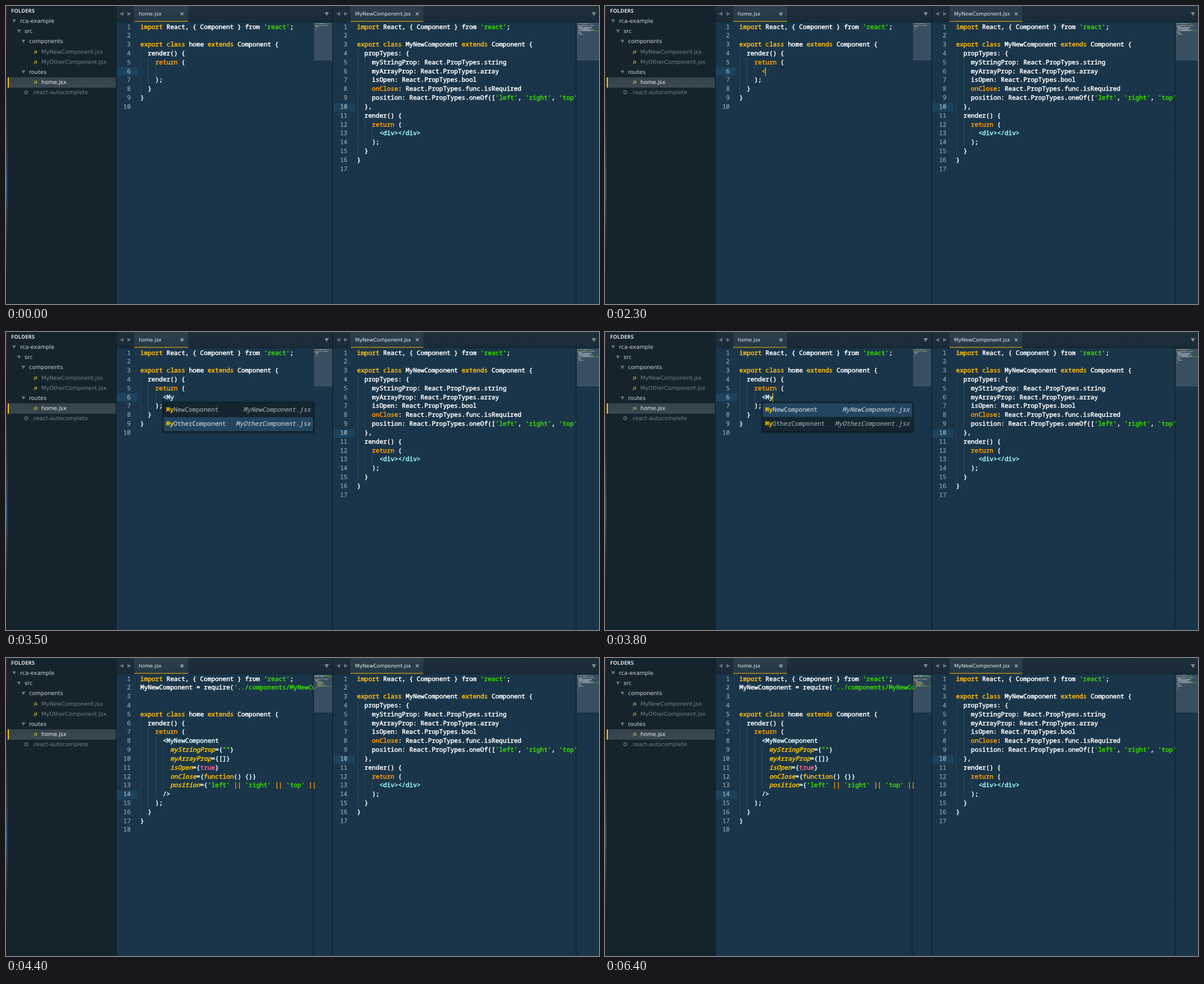
An HTML page with a canvas for the animation above (6.5 s loop, 1055 px wide and 531 px high).

```html
<!DOCTYPE html>
<html lang="en">
<head>
<meta charset="utf-8">
<title>Component autocomplete</title>
<style>
html, body { margin: 0; width: 100%; height: 100%; overflow: hidden; background: #1a3549; }
canvas { display: block; }
</style>
</head>
<body>
<canvas id="stage" width="1055" height="531"></canvas>
<script>
const ctx = document.getElementById('stage').getContext('2d');
ctx.textRendering = 'geometricPrecision';
ctx.lineJoin = 'round';

const LOOP = 6500, W = 1055, H = 531;
const CW = 6.65, LH = 15.82, TOP = 37, BASE = 3.5;
const MONO = '"Noto Sans Mono", "DejaVu Sans Mono", monospace';
const CODE = '11.08px ' + MONO;
const ITALIC = 'italic ' + CODE;
const UI = '"DejaVu Sans", "Noto Sans", sans-serif';
const YELLOW = '#ffc600';

// Each "~" starts a token; the letter after it picks the colour.
const COLORS = {
  w: '#ffffff', k: '#ffba12', o: '#ff9d00', g: '#3ad900',
  t: '#9effff', c: '#dcfbff', i: YELLOW, p: '#ff628c'
};

const IMPORT = "~kimport~w React, { Component } from ~g'react'~w;";
const classLine = name => `~kexport class~w ${name} ~kextends~w Component {`;

const homeCode = body => [
  '', classLine('home'), '~w  render() {', '~o    return~w (',
  ...body, '~w    );', '~w  }', '~w}', ''
];
const before = line => [IMPORT, ...homeCode([line])];
const after = [
  IMPORT,
  "~wMyNewComponent = require(~g'../components/MyNewComponent.jsx'~w);",
  '',
  ...homeCode([
    '~c      <MyNewComponent',
    '~i        myStringProp~c={~g""~c}',
    '~i        myArrayProp~c={[]}',
    '~i        isOpen~c={~ptrue~c}',
    '~i        onClose~c={~kfunction~c() {}}',
    "~i        position~c={~g'left' ~o|| ~g'right' ~o|| ~g'top' ~o|| ~g'bottom'~c}",
    '~c      />'
  ])
];
const component = [
  IMPORT, '', classLine('MyNewComponent'),
  '~w  propTypes: {',
  '~w    myStringProp: React.PropTypes.string',
  '~w    myArrayProp: React.PropTypes.array',
  '~w    isOpen: React.PropTypes.bool',
  '~o    onClose~w: React.PropTypes.func.isRequired',
  "~w    position: React.PropTypes.oneOf([~g'left'~w, ~g'right'~w, ~g'top'~w, ~g'bottom'~w])",
  '~w  },', '~w  render() {', '~o    return~w (',
  '~t      <div></div>',
  '~w    );', '~w  }', '~w}', ''
];

const rowY = row => TOP + (row - 1) * LH;
const rowTop = row => Math.round(rowY(row) - 6.7);

function rect(x, y, w, h, color) {
  ctx.fillStyle = color;
  ctx.fillRect(x, y, w, h);
}

// A positive weight thickens the strokes of the glyphs.
function text(str, x, y, color, font, align = 'left', weight = 0) {
  ctx.font = font;
  ctx.textAlign = align;
  ctx.fillStyle = ctx.strokeStyle = color;
  ctx.fillText(str, x, y);
  if (weight) {
    ctx.lineWidth = weight;
    ctx.strokeText(str, x, y);
  }
}

function triangle(x, y, angle, r, color) {
  ctx.save();
  ctx.translate(x, y);
  ctx.rotate(angle);
  ctx.fillStyle = color;
  ctx.beginPath();
  ctx.moveTo(r, 0);
  ctx.lineTo(-r * 0.8, -r);
  ctx.lineTo(-r * 0.8, r);
  ctx.fill();
  ctx.restore();
}

function disc(x, y, r, color) {
  ctx.fillStyle = color;
  ctx.beginPath();
  ctx.arc(x, y, r, 0, 7);
  ctx.fill();
}

function vertical(y0, y1, ...colors) {
  const g = ctx.createLinearGradient(0, y0, 0, y1);
  colors.forEach((c, i) => g.addColorStop(i / (colors.length - 1), c));
  return g;
}

function eachToken(line, draw) {
  let col = 0;
  for (const part of line.split('~').slice(1)) {
    const str = part.slice(1);
    draw(str, col, part[0]);
    col += str.length;
  }
}

const depthOf = line => line ? line.replace(/~./g, '').search(/\S|$/) / 2 : 0;

function sidebar() {
  rect(0, 0, 3, H, vertical(0, H, '#3a2226', '#241a20', '#2e3238', '#3f5668', '#26282e', '#1c1a1c'));
  rect(2.5, 0, 194, H, '#15232d');
  rect(3, 127, 193, 18.5, vertical(127, 146, '#34424b', '#3a4850'));
  rect(3, 127, 2, 18.5, YELLOW);
  rect(195.5, 0, 1, H, '#101d26');
  text('FOLDERS', 9, 11.5, '#d6dcdf', 'bold 9.5px "Noto Sans", sans-serif');

  const rows = [
    ['rca-example', 25, 14.5], ['src', 33, 23], ['components', 41, 31],
    ['MyNewComponent.jsx', 63], ['MyOtherComponent.jsx', 63],
    ['routes', 41, 31], ['home.jsx', 63], ['.react-autocomplete', 46.5]
  ];
  rows.forEach(([name, x, arrow], i) => {
    const y = 26.4 + i * 18.2;
    const open = name === 'home.jsx';
    const color = arrow ? '#ccd4d8' : open ? '#eef1f2' : '#73818a';
    text(name, x, y + 3.5, color, '9.8px ' + UI);
    if (arrow) triangle(arrow, y, Math.PI / 2, 3.4, '#65737c');
    if (x === 63) text('JS', 50, y + 2.5, '#d9c62c', 'bold 6.5px "Noto Sans", sans-serif');
  });
  ctx.strokeStyle = '#5c6a73';
  ctx.lineWidth = 1.6;
  ctx.beginPath();
  ctx.arc(36, 153.8, 2.7, 0, 7);
  ctx.stroke();
}

function tabBar(x, right, tabX, tabW, name, dirty) {
  rect(x, 0, right - x, 28, vertical(0, 28, '#1e2f3a', '#1a2b37'));
  rect(tabX, 0, tabW, 28, vertical(0, 28, '#2e3f4a', '#243945'));
  rect(x, 27.5, right - x, 1, '#11212c');
  rect(tabX, 26.7, tabW, 1.5, '#b8931b');
  triangle(x + 9.5, 14, Math.PI, 3.6, '#66757f');
  triangle(x + 22.5, 14, 0, 3.6, '#66757f');
  triangle(right - 10.5, 14, Math.PI / 2, 3.8, '#7d8a93');
  text(name, tabX + 8, 17, '#e6ebed', '8.95px ' + UI);
  const cx = tabX + tabW - 11;
  if (dirty) return disc(cx, 14, 3, '#7f8c94');
  ctx.strokeStyle = '#a3adb3';
  ctx.lineWidth = 1.4;
  ctx.beginPath();
  for (const s of [-1, 1]) {
    ctx.moveTo(cx - 2.4, 14 - 2.4 * s);
    ctx.lineTo(cx + 2.4, 14 + 2.4 * s);
  }
  ctx.stroke();
}

function minimap(lines, x, right) {
  rect(x, 30, right - x, 67, '#394f61');
  ctx.globalAlpha = 0.55;
  lines.forEach((line, i) => eachToken(line, (str, col, c) => {
    for (const word of str.matchAll(/\S+/g)) {
      const wx = x + 0.5 + (col + word.index) * 0.66;
      const w = Math.min(word[0].length * 0.66, right - wx);
      if (w > 0) rect(wx, 31 + i * 1.58, w, 1, COLORS[c]);
    }
  }));
  ctx.globalAlpha = 1;
}

function pane(lines, x, mapX, right, active, overflow) {
  rect(x, 28, right - x, H - 28, '#1a3549');
  rect(x, rowTop(active), 38, 15.5, '#1c425d');
  const left = x + 42.5;
  if (overflow) {
    const g = ctx.createLinearGradient(mapX - 4, 0, mapX, 0);
    g.addColorStop(0, 'rgba(8,20,30,0)');
    g.addColorStop(1, 'rgba(8,20,30,0.5)');
    rect(mapX - 4, 28, 4, H, g);
  }
  ctx.save();
  ctx.beginPath();
  ctx.rect(x, 28, mapX + 1.5 - x, H);
  ctx.clip();
  lines.forEach((line, i) => {
    const y = rowY(i + 1);
    text(String(i + 1), x + 25.5, y + BASE, i + 1 === active ? '#a5b2ba' : '#8f9fa9', CODE, 'right', 0.25);
    for (let d = 0; d < depthOf(line); d++) {
      rect(Math.round(left + d * 2 * CW), y - 8, 1, LH, 'rgba(255,255,255,0.09)');
    }
    eachToken(line, (str, col, c) => {
      const skip = str.search(/\S|$/);
      text(str.slice(skip), left + (col + skip) * CW, y + BASE, COLORS[c], c === 'i' ? ITALIC : CODE, 'left', 0.5);
    });
  });
  ctx.restore();
  minimap(lines, mapX, right);
}

function popup(typed, selected) {
  ctx.save();
  ctx.shadowColor = 'rgba(0,0,0,0.5)';
  ctx.shadowBlur = 4;
  rect(279, 125, 269, 53.5, '#0f1b23');
  ctx.restore();
  ['MyNewComponent', 'MyOtherComponent'].forEach((name, i) => {
    const y = 126.5 + i * 25.3, on = i === selected;
    rect(280.5, y, 266, 25, on ? '#234560' : '#15252f');
    text(typed, 285, y + 15, YELLOW, 'bold ' + CODE);
    text(name.slice(typed.length), 285 + typed.length * CW, y + 15, on ? '#b9cad5' : '#929ca2', CODE, 'left', 0.25);
    text(name + '.jsx', 542, y + 15, on ? '#b3c5d0' : '#8f9aa0', ITALIC, 'right', 0.25);
  });
}

// Key times in ms
const FOCUS = 510, TAG = 2000, M = 2400, Y = 2700, DOWN = 3400, UP = 3700, INSERT = 3900, BLUR = 5700;

function draw(t) {
  const typed = t < TAG ? '' : t < M ? '<' : t < Y ? '<M' : '<My';
  const done = t >= INSERT;
  const focused = t >= FOCUS && t < BLUR;
  const lastKey = [INSERT, Y, M, TAG, FOCUS].find(k => t >= k);
  const lines = done ? after : before((typed === '<' ? '~o' : '~c') + '      ' + typed);
  const active = done ? 14 : 6;

  pane(lines, 196.5, 548, 581, active, done);
  pane(component, 582, 1015.5, W, 10, true);
  tabBar(196.5, 581, 228, 96, 'home.jsx', t >= TAG);
  tabBar(582, 1056.5, 613, 129.5, 'MyNewComponent.jsx', false);
  rect(580.5, 0, 1.5, H, '#0f1f2a');
  sidebar();

  if (focused) {
    const open = done ? 7 : 5, close = done ? 15 : 7;
    rect(239 + 11 * CW, rowY(open) + 8.7, CW, 1, '#0b1a24');
    rect(239 + 4 * CW, rowY(close) + 8.7, CW, 1, '#0b1a24');
    if ((t - lastKey) % 1000 < 500) {
      const col = 6 + (done ? 2 : typed.length);
      rect(Math.floor(239 + col * CW), rowTop(active), 1.2, 15.5, '#f0bd0a');
    }
  }
  if (t >= M && !done) popup(typed.slice(1), t >= DOWN && t < UP ? 1 : 0);
}

const start = performance.now();
function tick() {
  draw((performance.now() - start) % LOOP);
  requestAnimationFrame(tick);
}
tick();
</script>
</body>
</html>
```
